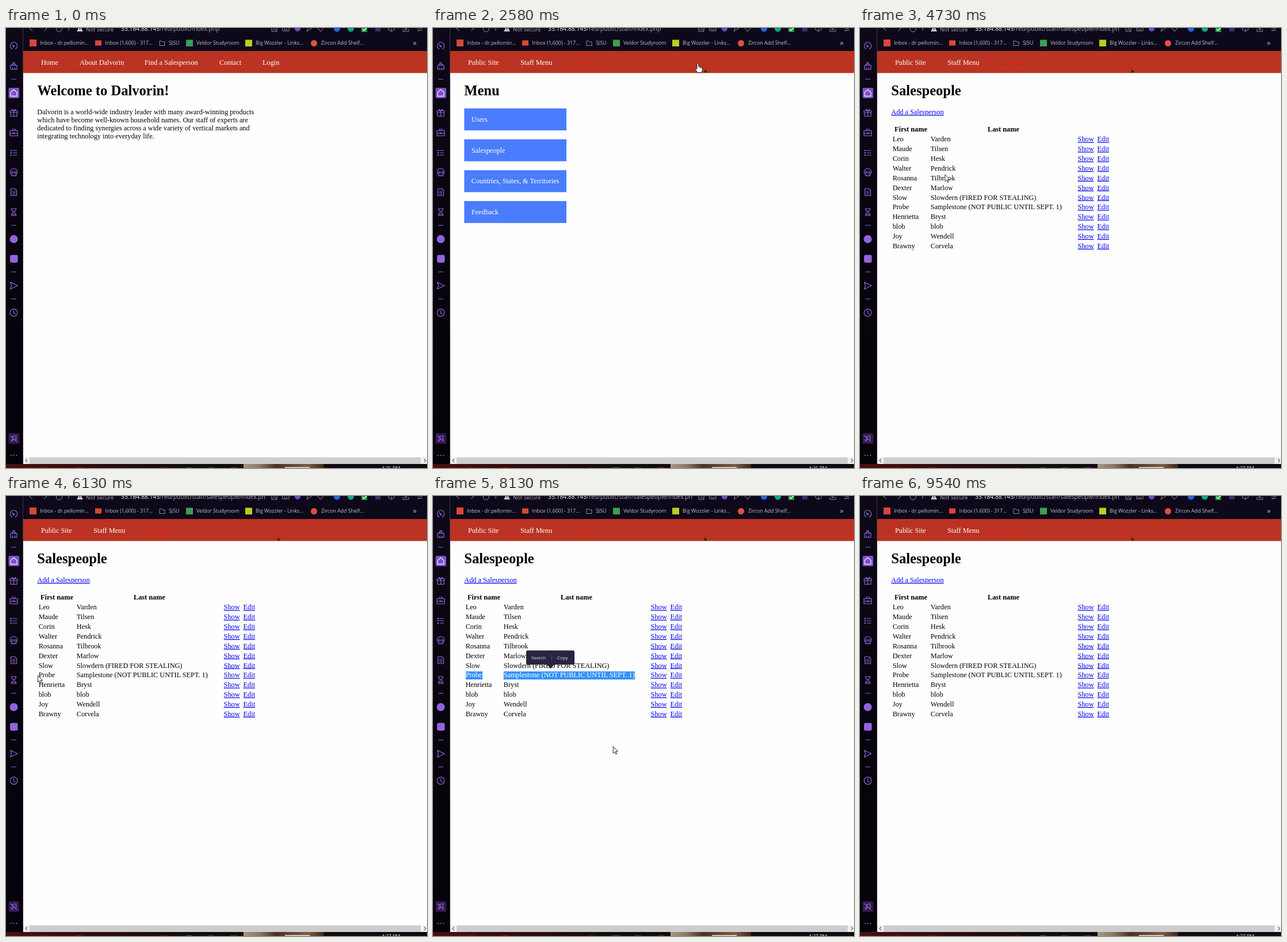
Animation of 732 by 765 pixels, one loop 9600 ms. Source, as an HTML page:

```html
<!DOCTYPE html>
<html lang="en">
<head>
<meta charset="utf-8">
<title>Staff site walkthrough</title>
<style>
  html, body { margin: 0; width: 100%; height: 100%; overflow: hidden; background: #0b0814; }
  svg { display: block; width: 732px; height: 765px; }
  text { white-space: pre; }
  .page { font: 12.28px "Liberation Serif", "Times New Roman", serif; }
  .ui { font: 8.85px "Open Sans", "Noto Sans", sans-serif; }
  .h1 { font-size: 24.56px; font-weight: bold; }
  .b { font-weight: bold; }
  .link { fill: #00e; text-decoration: underline; }
  .line { fill: none; stroke: #9167dc; stroke-width: 1.2; stroke-linejoin: round; stroke-linecap: round; }
  .tool { fill: none; stroke: #8f89a3; stroke-width: 1; stroke-linejoin: round; }
</style>
</head>
<body>
<svg id="stage" viewBox="0 0 732 765"></svg>
<script>
const LOOP = 9600;
const text = (x, y, str, attrs = '') => `<text x="${x}" y="${y}" ${attrs}>${str}</text>`;
const rect = (x, y, w, h, fill, attrs = '') =>
  `<rect x="${x}" y="${y}" width="${w}" height="${h}" fill="${fill}" ${attrs}/>`;
const dot = (x, y, r, fill) => `<circle cx="${x}" cy="${y}" r="${r}" fill="${fill}"/>`;
const path = (d, attrs = '') => `<path d="${d}" ${attrs}/>`;
const icon = (y, d) => path(d, `class="line" transform="translate(13.5 ${y})"`);
const ring = r => `M${-r} 0a${r} ${r} 0 1 1 ${2 * r} 0a${r} ${r} 0 1 1 ${-2 * r} 0`;

const sidebar = rect(0, 0, 29, 758, 'url(#side)') + rect(29, 0, 1, 758, '#3d364c') +
  icon(31, 'M-3 5.4A6.2 6.2 0 1 1 3 5.4M0 1L-3-2M-1 1a1 1 0 1 0 2 0a1 1 0 1 0-2 0') +
  icon(66, 'M-5.5-1H5.5V6H-5.5ZM-4-1L-2-3H2L4-1M-1.5-3V-6H1.5V-3M-2 3V6M2 3V6') +
  [89, 343, 424, 471].map(y => icon(y, 'M-4 0H4')).join('') +
  rect(4.5, 104, 18.5, 18, '#7d50c8', 'rx="2"') +
  path('M8 112L13.5 107L19 112V118.5H8Z', 'fill="none" stroke="#f0e6ff" stroke-width="1.3" stroke-linejoin="round"') +
  icon(147, 'M-6.5-3H6.5V0H-6.5ZM-5.5 0V6.5H5.5V0M0-3V6.5M0-3C-5-4-4-8 0-3C4-8 5-4 0-3') +
  icon(182, 'M-6.5-3.5H6.5V5.5H-6.5ZM-2.5-3.5V-6H2.5V-3.5M-6.5 1H-1.5M1.5 1H6.5M-1.5 0H1.5V2H-1.5Z') +
  icon(217, 'M-1.5-4H5.5M-1.5 0H5.5M-1.5 4H5.5M-5.5-4.5H-4V-3.5H-5.5ZM-5.5-.5H-4V.5H-5.5ZM-5.5 3.5H-4V4.5H-5.5Z') +
  icon(251, 'M-4 3C-8 0-6-6.5 0-6.5S8 0 4 3V6H-4ZM-1.5 4V6M1.5 4V6M-4 0a1.5 1.5 0 1 0 3 0a1.5 1.5 0 1 0-3 0M1 0a1.5 1.5 0 1 0 3 0a1.5 1.5 0 1 0-3 0') +
  icon(285.5, 'M-5-6H2L5-3V6H-5ZM-2.5-1.5H2.5M-2.5 1H2.5M-2.5 3.5H2.5') +
  icon(320, 'M-4.5-6H4.5M-4.5 6H4.5M-3.5-6V-3L3.5 3V6M3.5-6V-3L-3.5 3V6M-2 4H2') +
  dot(13.5, 367, 7, '#9163de') + rect(7, 394.5, 13.5, 13.5, '#9163de', 'rx="3"') +
  icon(448, 'M-6-6L6.5 0L-6 6L-4 0Z') +
  icon(495, ring(6.3) + 'M0-3.5V.5L2.5 2.5') +
  rect(4.5, 704.5, 18.5, 18.5, '#321a4e', 'rx="2"') +
  icon(714, 'M-1.5 3V-4L4-5V2M-5.5-5L5 5M-4.5 3a1.5 1.5 0 1 0 3 0a1.5 1.5 0 1 0-3 0') +
  [8.7, 13.5, 18.3].map(x => dot(x, 743, 1.1, '#9167dc')).join('');

const bookmarks = [
  [59, 'Inbox - dr.pellomin...'], [172.5, 'Inbox (1,600) - 317...'], [283, 'SJSU'],
  [331, 'Veldor Studyroom'], [434, 'Big Wozzler - Links...'], [548, 'Zircon Add Shelf...']
].map(([x, s]) => text(x, 29.2, s)).join('');

const toolbar = rect(30, 0, 702, 40, '#0e091a') +
  path('M46-3L41 1L46 5M66-3L71 1L66 5M109-2V5', 'class="tool"') +
  path('M97 0A5 5 0 1 1 94-3', 'class="tool" id="reload"') +
  path('M89-3L96 4.5M96-3L89 4.5', 'class="tool" id="stop"') +
  path('M128.5-4L134 6H123Z', 'fill="#c9c6d2"') + rect(128, 0, 1, 3, '#0e091a') +
  text(139, 5.8, 'Not secure', 'style="font-size:9.6px" fill="#a9a5b6"') +
  `<g clip-path="url(#urlClip)"><text x="200" y="5" style="font-size:10.3px" fill="#f0eef5">35.184.88.145<tspan id="url" fill="#aaa6b6"></tspan></text></g>` +
  path('M462-2V6H471V-2M464 4L467 1L470 5M481-2V5H492V-2M484 1a2.5 2.5 0 1 0 5 0M523-3L532 0L523 6L525 1ZM542 0L547 6L552 0M665-2V3L670 6L675 3V-2M670 1V6M690 2V6H700V2M695-3V3M692 1L695 3.5L698 1M715 0H724M715 4H724M721-1V2M718 3V5.5', 'class="tool"') +
  dot(507, 1, 5, '#7449c4') + dot(575.5, 1, 5.5, '#2565d8') + dot(599.5, 1, 5.5, '#11a683') +
  rect(618, -4, 10, 11, '#1c9c45') + path('M620 2L622.5 4.5L626.5 0', 'fill="none" stroke="#fff" stroke-width="1.3"') +
  rect(642, -3, 9, 9, '#3a2b70') +
  rect(41, 20, 12, 12, '#d8473c') + rect(155, 21.5, 11, 9, '#dc4638') +
  path('M267 22.5H270.5L272 24H276V30.5H267Z', 'class="tool"') +
  rect(313, 20.5, 12, 11.5, '#3f9d55') + rect(416, 20.5, 12, 11.5, '#b9cf20') + dot(535.5, 26.5, 5.5, '#df5044') +
  `<g fill="#c4c0cf">${bookmarks}${text(707.5, 30, '»', 'style="font-size:13px"')}</g>`;

const nav = items => items.map(([x, s]) => text(x, 64, s, 'fill="#fff"')).join('');
const title = s => text(54.3, 117, s, 'class="h1"');

const home = nav([[61, 'Home'], [128, 'About Dalvorin'], [241, 'Find a Salesperson'], [371, 'Contact'], [446, 'Login']]) +
  title('Welcome to Dalvorin!') +
  ['Dalvorin is a world-wide industry leader with many award-winning products',
   'which have become well-known household names. Our staff of experts are',
   'dedicated to finding synergies across a wide variety of vertical markets and',
   'integrating technology into everyday life.'
  ].map((s, i) => text(54.3, 150 + i * 13.85, s)).join('');

const staffNav = nav([[61, 'Public Site'], [152, 'Staff Menu']]) + text(245, 64, 'Log out', 'fill="#ea181b"');

const menu = title('Menu') + ['Users', 'Salespeople', 'Countries, States, &amp; Territories', 'Feedback'].map((s, i) => {
  const y = 139.8 + i * 53.7;
  return rect(54.3, y, 177.7, 38.2, '#4a7dfd', `id="item${i}"`) + text(66.8, y + 23.2, s, 'fill="#fff"');
}).join('');

const people = [
  ['Leo', 'Varden'], ['Maude', 'Tilsen'], ['Corin', 'Hesk'], ['Walter', 'Pendrick'],
  ['Rosanna', 'Tilbrook'], ['Dexter', 'Marlow'], ['Slow', 'Slowdern (FIRED FOR STEALING)'],
  ['Probe', 'Samplestone (NOT PUBLIC UNTIL SEPT. 1)'], ['Henrietta', 'Bryst'],
  ['blob', 'blob'], ['Joy', 'Wendell'], ['Brawny', 'Corvela']
];
const rowY = i => 197.3 + i * 16.87;
const names = (i, attrs) => text(56.7, rowY(i), people[i][0], attrs) + text(122.8, rowY(i), people[i][1], attrs);
const sales = title('Salespeople') + text(54.3, 150, 'Add a Salesperson', 'class="link"') +
  text(60, 180.2, 'First name', 'class="b"') + text(222, 180.2, 'Last name', 'class="b"') +
  people.map((_, i) => names(i) + text(378.6, rowY(i), 'Show', 'class="link"') +
    text(412.6, rowY(i), 'Edit', 'class="link"')).join('') +
  `<g clip-path="url(#selClip)">${rect(57, 305, 29, 14, '#3392fb')}${rect(122.8, 305, 228.4, 14, '#3392fb')}${names(7, 'fill="#fff"')}</g>`;

const popup = rect(162, 268.5, 84, 24.8, '#29243f', 'rx="3"') + path('M198 293H211L204.5 300Z', 'fill="#29243f"') +
  rect(206, 275, 1, 12, '#51417e') +
  `<g fill="#e4e1ee" style="font-size:8px">${text(171, 283.8, 'Search')}${text(216, 283.8, 'Copy')}</g>`;

const scrollbar = rect(30, 746, 702, 12, '#f1f1f1') + rect(41, 746.6, 680, 11.2, '#cdcdcd', 'id="thumb"') +
  path('M37 749L34 752L37 755M727 749L730 752L727 755', 'fill="none" stroke="#606060" stroke-width="1.2"');

const taskbar = rect(0, 758, 732, 7, 'url(#bar)') + rect(413, 758, 140, 7, 'url(#photo)') +
  rect(485, 763.5, 43, 1.5, '#ece6da') +
  [[60, '#6e1714'], [120, '#8b1916'], [268, '#571410'], [312, '#4b5552'], [350, '#3b4a3b'], [390, '#5e3a20']]
    .map(([x, c]) => rect(x, 764, 12, 1, c)).join('') +
  text(653, 768.7, '', 'id="clock" fill="#eee" style="font-size:8.6px"');

const stage = document.getElementById('stage');
stage.innerHTML = `<defs>
  <linearGradient id="side" x2="0" y2="1"><stop stop-color="#0d0918"/><stop offset=".5" stop-color="#07040d"/><stop offset="1" stop-color="#050308"/></linearGradient>
  <linearGradient id="bar"><stop stop-color="#4a100f"/><stop offset=".2" stop-color="#320c0c"/><stop offset=".4" stop-color="#140c0e"/><stop offset="1" stop-color="#0d0a10"/></linearGradient>
  <linearGradient id="photo"><stop stop-color="#a99682"/><stop offset=".2" stop-color="#8b7762"/><stop offset=".4" stop-color="#493022"/><stop offset=".8" stop-color="#7a5d45"/><stop offset="1" stop-color="#3d2718"/></linearGradient>
  <clipPath id="urlClip"><rect x="190" width="262" height="20"/></clipPath>
  <clipPath id="selClip"><rect id="selection" x="56" y="300" width="0" height="24"/></clipPath>
</defs>` +
  rect(30, 40, 702, 718, '#fefefe') + rect(30, 40, 702, 38.3, '#bb3322') +
  `<g class="ui">${sidebar}${toolbar}</g>
  <g class="page"><g id="home">${home}</g><g id="staffNav">${staffNav}</g><g id="menu">${menu}</g><g id="sales">${sales}</g></g>` +
  path('M472 71.5L477 76.5L472.3 78Z', 'id="speck" fill="#33201e"') + scrollbar +
  `<g class="ui"><g id="popup">${popup}</g><g id="status">${rect(29.5, 737.5, 0, 20.5, '#fff', 'id="statusBox" stroke="#b9b9b9"')}${text(36, 752, '', 'id="statusText" fill="#555" style="font-size:9.4px"')}</g>${taskbar}</g>
  <g id="cursor" stroke="#111" stroke-width=".9" fill="#fff" stroke-linejoin="round">` +
  path('M0 0V11.8L2.8 9.3L4.7 13.6L6.5 12.8L4.6 8.6H8.2Z', 'id="arrow"') +
  path('M-1.4 1.3Q0-1 1.4 1.3V6Q4.5 5 8 7.7V12Q7.5 14 6.3 16.5H-.5L-4 11.3Q-4.5 8.2-1.4 10.3ZM3.7 6V9M5.9 6.8V9.3', 'id="hand"') +
  path('M-2.5-7H2.5M0-7V7M-2.5 7H2.5', 'id="beam"') + '</g>';

const $ = Object.fromEntries([...stage.querySelectorAll('[id]')].map(e => [e.id, e]));
const show = (name, on) => { $[name].style.display = on ? '' : 'none'; };
const within = (t, a, b) => t >= a && t < b;

// Pointer track: time, x, y
const track = [
  [0, 668, 790], [109, 668, 790], [110, 667, 752], [300, 610, 610], [520, 500, 400], [720, 415, 240],
  [840, 387, 170], [940, 440, 133], [1070, 455, 92], [1130, 462, 78], [1260, 470, 66],
  [1650, 462, 63], [1860, 462, 63], [1920, 460.5, 61], [2580, 460.5, 61], [2640, 455, 66],
  [2900, 370, 110], [3150, 240, 180], [3350, 178, 215], [3480, 169.5, 221], [4310, 169.5, 221],
  [4400, 165, 217], [4700, 150, 250], [4950, 132, 290], [5140, 125, 306], [5330, 125, 306],
  [5460, 59, 312], [5600, 54, 307], [5860, 52, 312], [6060, 52, 312], [6130, 55.5, 312],
  [6390, 55.5, 312], [6520, 60, 305], [6900, 150, 303], [7320, 275, 303], [7400, 288, 303],
  [7730, 361, 303], [7930, 361, 303], [8130, 313, 435], [8300, 350, 510], [8850, 610, 684],
  [8920, 612, 700], [9130, 615, 775], [LOOP, 615, 790]
];

function pointer(t) {
  const i = track.findIndex(k => k[0] > t);
  const [t0, x0, y0] = track[i - 1], [t1, x1, y1] = track[i];
  const p = (t - t0) / (t1 - t0);
  return [x0 + (x1 - x0) * p, y0 + (y1 - y0) * p];
}

function render(t) {
  const [x, y] = pointer(t);
  const onMenu = within(t, 2300, 3900), onSales = t >= 3900;
  show('home', t < 2300);
  show('staffNav', t >= 2300);
  show('menu', onMenu);
  show('sales', onSales);
  const folder = onSales ? 'staff/salespeople/' : onMenu ? 'staff/' : '';
  $.url.textContent = `/red/public/${folder}index.php`;

  const loading = within(t, 2150, 2390) || within(t, 3700, 3900);
  show('reload', !loading);
  show('stop', loading);

  const login = within(t, 1260, 2390), salesHover = within(t, 3300, 3900);
  show('status', login || salesHover);
  $.statusBox.setAttribute('width', login ? 225 : 280.5);
  $.statusText.textContent = `https://35.184.88.145/red/public/staff/${login ? '' : 'salespeople/'}index.php`;
  $.statusText.style.opacity = t >= 3780 ? 0.6 : 1;
  $.item1.setAttribute('fill', salesHover ? '#3f6fe0' : '#4a7dfd');

  const selected = within(t, 6390, 8480);
  $.selection.setAttribute('width', selected ? Math.max(0, (t < 7730 ? x : 361) - 56) : 0);
  show('popup', within(t, 7990, 8480));
  show('speck', t >= 1260);
  $.thumb.setAttribute('fill', within(t, 9000, 9080) ? '#a8a8a8' : '#cdcdcd');
  $.clock.textContent = t < 4700 ? '4:26 PM' : '4:27 PM';

  const hand = within(t, 1260, 2640) || within(t, 3300, 3970);
  const beam = within(t, 6450, 7930);
  show('hand', hand);
  show('beam', beam);
  show('arrow', !hand && !beam);
  $.cursor.setAttribute('transform', `translate(${x.toFixed(2)} ${y.toFixed(2)})`);
}

const start = performance.now();
function tick() {
  render((performance.now() - start) % LOOP);
  requestAnimationFrame(tick);
}
render(0);
requestAnimationFrame(tick);
</script>
</body>
</html>
```
